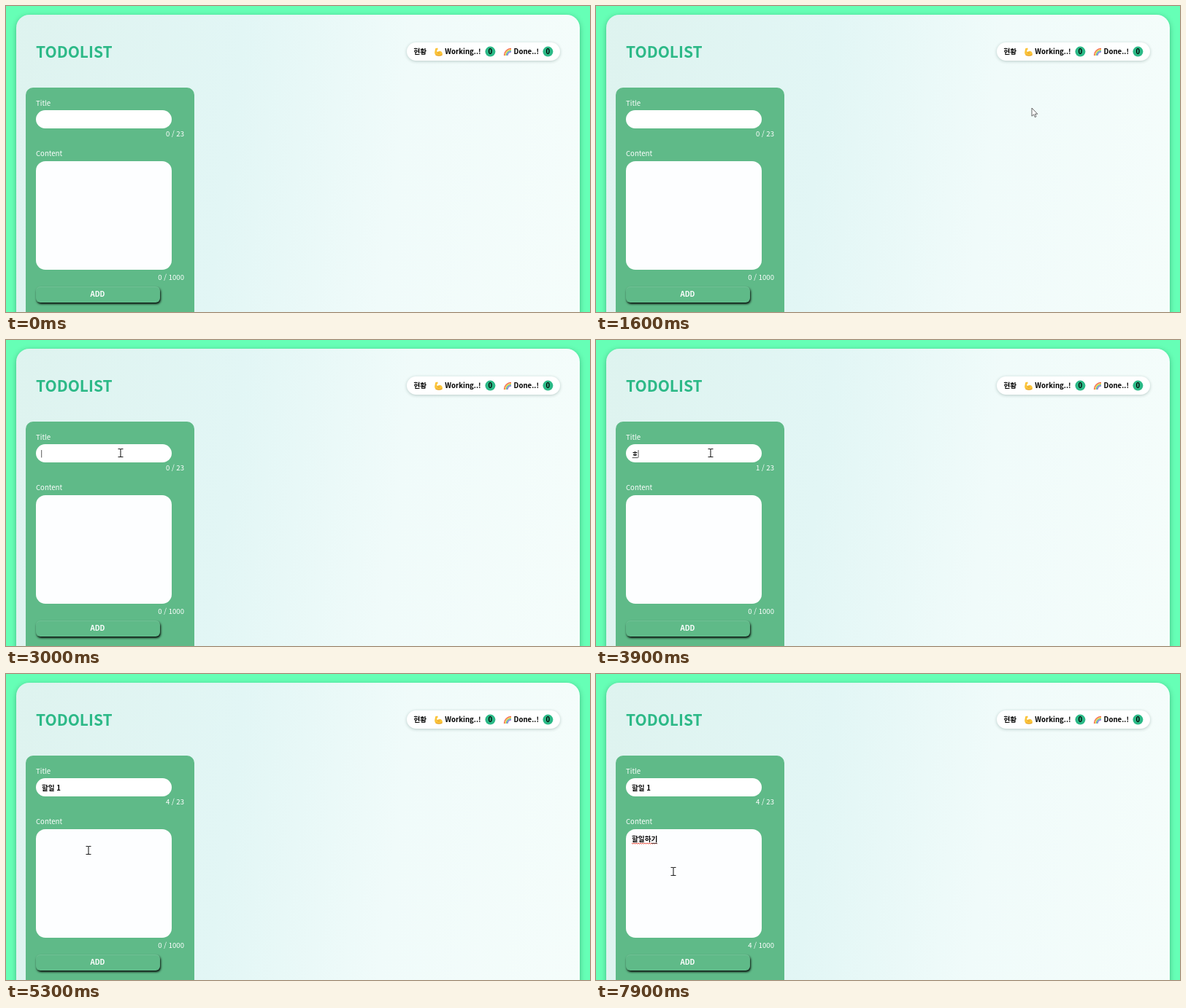
Animation, 800 px wide and 420 px high, one loop 8 s. Source, as an HTML page:

```html
<!DOCTYPE html>
<html lang="ko">
<head>
<meta charset="utf-8">
<title>Todolist</title>
<style>
  html, body { margin: 0; width: 100%; height: 100%; overflow: hidden; }
  body { position: relative; background: #66ffb6; }
  div, svg { position: absolute; box-sizing: border-box; }
  .card {
    left: 14px; top: 12px; width: 772px; height: 440px; border-radius: 18px;
    background: linear-gradient(97deg, #def3ef 0%, #e2f6f5 38%, #f0fbfa 66%, #f5fdfb 100%);
    box-shadow: 0 2px 7px rgba(0, 60, 40, .36);
  }
  .panel { left: 27px; top: 112px; width: 231px; height: 330px; border-radius: 10px; background: #5fba88; }
  .field { left: 41px; width: 186px; background: #fff; }
  .line { top: 143px; height: 25px; border-radius: 12.5px; }
  .area { top: 213px; height: 149px; border-radius: 13px; background: #fdfeff; }
  .add {
    left: 41px; top: 385px; width: 170px; height: 22px; border-radius: 6px; background: #5fba88;
    box-shadow: 1px 2px 3px rgba(0, 0, 0, .95), inset 0 1px 1px rgba(255, 255, 255, .12);
  }
  .pill {
    left: 549px; top: 50px; width: 210px; height: 25px; border-radius: 12.5px;
    background: #fff; box-shadow: 0 1px 4px rgba(0, 50, 40, .24);
  }
  svg { left: 0; top: 0; }
  text {
    font: 500 9.6px "Noto Sans CJK KR", "Noto Sans KR", "Noto Sans CJK", sans-serif;
    fill: #fff; white-space: pre;
  }
  .dark { font-weight: 700; fill: #000; }
  .bold { font-weight: 700; }
  .end { text-anchor: end; }
  .mid { text-anchor: middle; }
  h1 { margin: 0; }
  .head { font-size: 21px; font-weight: 700; fill: #2cb987; }
</style>
</head>
<body>
<div class="card"></div>
<div class="panel"></div>
<div class="field line"></div>
<div class="field area"></div>
<div class="add"></div>
<div class="pill"></div>

<svg width="800" height="420" viewBox="0 0 800 420">
  <text class="head" x="41" y="71">TODOLIST</text>

  <text class="dark" x="558.5" y="66.4">현황</text>
  <text class="dark" x="601.3" y="66.4">Working..!</text>
  <text class="dark" x="695.6" y="66.4">Done..!</text>
  <g fill="#2cb987"><circle cx="663.4" cy="62.6" r="7"/><circle cx="742.4" cy="62.6" r="7"/></g>
  <text class="dark mid" x="663.4" y="66.2">0</text>
  <text class="dark mid" x="742.4" y="66.2">0</text>

  <!-- flexed arm -->
  <path d="M588.2 58.2 L591 57.6 Q592.4 58.6 591.2 60.2 L590.2 60.6 L590.6 63.4 Q593.4 60.6 596.2 62.4 Q598.6 64.4 597.6 67.4 Q594 69.4 589.6 68 Q587 67 587.2 63.6 Z" fill="#fbc43a"/>
  <path d="M590.6 63.4 Q592 65.4 594.2 64.6 M588.6 67.4 Q593 69.2 597.4 67.3" fill="none" stroke="#d98a1e" stroke-width=".7"/>

  <!-- rainbow -->
  <g id="bow" fill="none" stroke-width="1.1"></g>

  <text x="41" y="136.6">Title</text>
  <text x="41" y="206">Content</text>
  <text class="end" id="count1" x="244" y="178.8"></text>
  <text class="end" id="count2" x="244" y="375.8"></text>
  <text class="bold mid" x="125.5" y="399.4">ADD</text>

  <text class="dark" id="text1" x="49" y="159.6"></text>
  <text class="dark" id="text2" x="49" y="230.4"></text>
  <path id="wave" fill="none" stroke="#e8402f" stroke-width="1"/>
  <path id="under" stroke="#222" stroke-width=".8"/>
  <path id="caret" stroke="#333" stroke-width=".8"/>

  <path id="arrow" d="M0 0 V11.2 L2.6 8.8 L4.3 12.6 L6 11.8 L4.4 8.2 H7.8 Z" fill="#fff" stroke="#555" stroke-width=".9" stroke-linejoin="round"/>
  <path id="beam" d="M-3.5 -5.5 H-1 Q0 -5.5 0 -4.5 Q0 -5.5 1 -5.5 H3.5 M0 -4.5 V4.5 M-3.5 5.5 H-1 Q0 5.5 0 4.5 Q0 5.5 1 5.5 H3.5" fill="none" stroke="#222" stroke-width="1.1"/>
</svg>

<script>
const LOOP = 8000, TICK = 100;
const $ = id => document.getElementById(id);

['#ee5a4f', '#f7a64a', '#f5dc5c', '#74c476', '#5aa7e8', '#a27bd0'].forEach((color, i) => {
  const r = 9.6 - i * 0.95;
  $('bow').innerHTML += `<path d="M${692 - r} 68 A${r} ${r} 0 0 1 692 ${68 - r}" stroke="${color}"/>`;
});

// [time, x, y] of the pointer
const path = [
  [300, 783, 224], [400, 650, 166], [500, 598, 144],
  [1300, 598, 143], [1400, 597, 142], [1500, 597, 141], [1600, 597, 140],
  [2100, 586, 139], [2200, 520, 136], [2300, 405, 135], [2400, 285, 140],
  [2500, 203, 150], [2600, 166, 154], [2700, 157, 155],
  [5000, 155, 159], [5100, 146, 178], [5200, 128, 209], [5300, 113, 242],
  [5400, 107, 264], [5500, 106, 271]
];

// [time, text, is the last syllable being composed]
const typed1 = [
  [0, ''], [3200, 'ㅎ', 1], [3700, ''], [3900, 'ㅎ', 1], [4000, '하', 1], [4100, '할', 1],
  [4200, '할ㅇ', 1], [4300, '할이', 1], [4400, '할일', 1], [4500, '할일 '], [4600, '할일 1']
];
const typed2 = [
  [0, ''], [6000, 'ㅎ', 1], [6100, '하', 1], [6200, '할', 1], [6300, '할ㅇ', 1], [6400, '할이', 1],
  [6500, '할일', 1], [6700, '할일하', 1], [6800, '할일학', 1], [6900, '할일하기', 1]
];

const at = (list, t) => list.filter(step => step[0] <= t).pop();
const within = (t, a, b) => t >= a && t < b;
const inField = (x, y) => x > 41 && x < 227 && (within(y, 143, 168) || within(y, 213, 362));

function place(node, show, x, y) {
  node.style.display = show ? '' : 'none';
  if (show) node.setAttribute('transform', `translate(${x} ${y})`);
}

function wavy(x, y, w) {
  let d = `M${x} ${y}`;
  for (let i = 1; i * 1.5 <= w; i++) d += ` L${x + i * 1.5} ${y + (i % 2 ? 1.2 : 0)}`;
  return d;
}

function draw(now) {
  const t = Math.floor(now % LOOP / TICK) * TICK;

  const pos = at(path, t);
  const [, x, y] = pos || [0, 0, 0];
  const text = inField(x, y);
  place($('arrow'), pos && !text, x, y);
  place($('beam'), pos && text, x, y);

  const [, one, busy1] = at(typed1, t);
  const [, two, busy2] = at(typed2, t);
  $('text1').textContent = one;
  $('text2').textContent = two;
  $('count1').textContent = `${one.length} / 23`;
  $('count2').textContent = `${two.length} / 1000`;

  const second = t >= 5200;
  const word = second ? two : one;
  const base = second ? 230.4 : 159.6;
  const width = word ? $(second ? 'text2' : 'text1').getComputedTextLength() : 0;
  const end = 49 + width;
  const busy = second ? busy2 : busy1;
  const blink = within(t, 2900, 5200) || within(t, 5500, 7500);

  $('caret').setAttribute('d', blink ? `M${end + (word ? .2 : -.3)} ${base - 8.6} v10.4` : '');
  $('under').setAttribute('d', busy ? `M${end - width / word.length + .6} ${base + 2} H${end - .3}` : '');
  $('wave').setAttribute('d', t >= 7900 ? wavy(49, base + 1.6, width) : '');
}

const start = performance.now();
function frame() {
  draw(performance.now() - start);
  requestAnimationFrame(frame);
}
frame();
</script>
</body>
</html>
```
